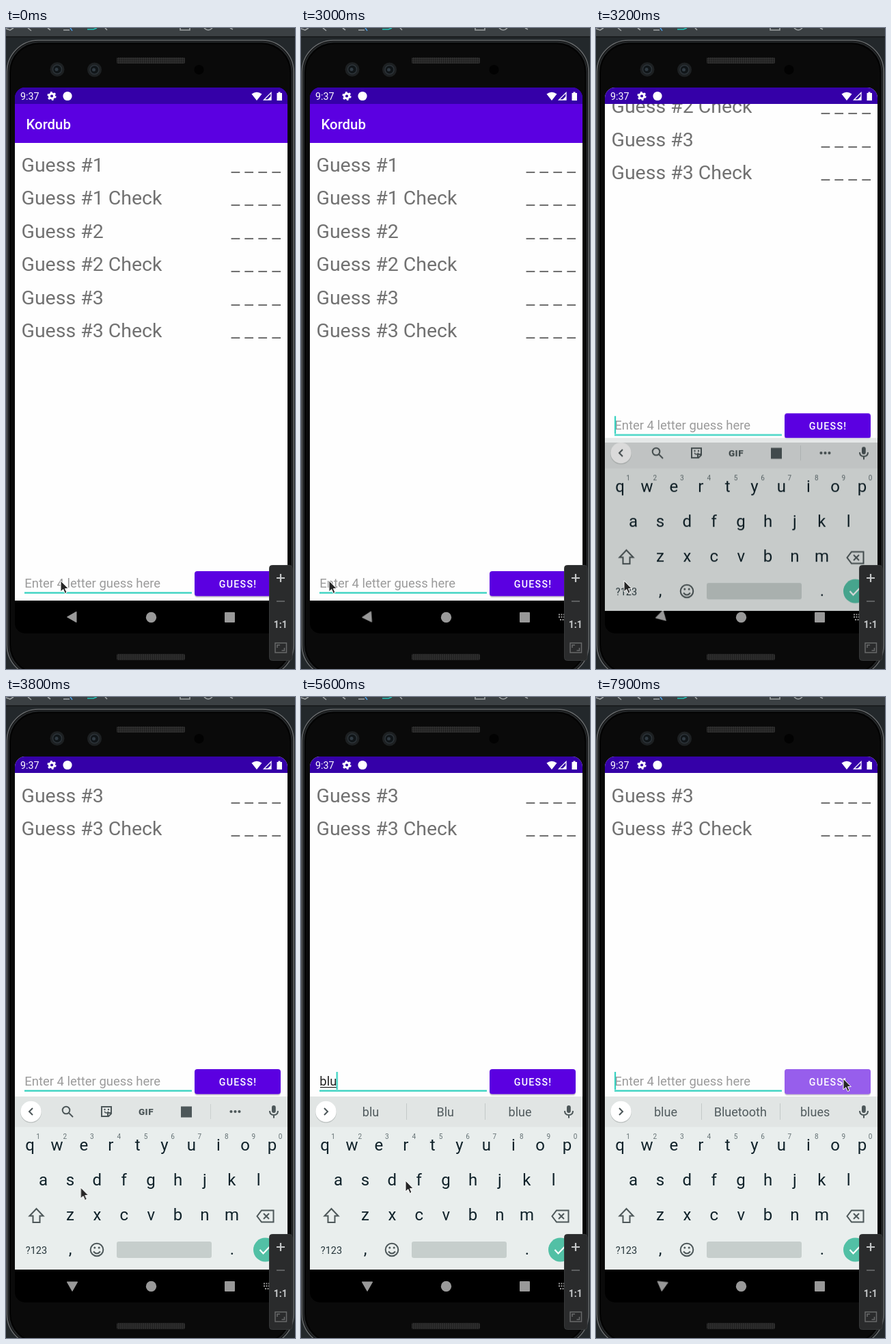
Write an HTML page that moves like this. It is 423 px wide and 937 px high and loops after 8 s.

```html
<!DOCTYPE html>
<html lang="en">
<head>
<meta charset="utf-8">
<title>Word guessing app</title>
<style>
html, body { margin: 0; width: 100%; height: 100%; overflow: hidden; background: #23282b; }
svg { display: block; width: 100vw; height: 100vh; font-family: Roboto, sans-serif; }
.anim, .caret, .ink tspan { animation: 8s linear infinite; }
.step, .caret, .ink tspan { animation-timing-function: step-end; }
.mid { text-anchor: middle; }
.icon { fill: none; stroke: #4d5759; stroke-width: 2; }

#mouse { animation-name: mouse; }
@keyframes mouse {
  0%, 7.5% { transform: translate(80px, 808px); }
  8.75% { transform: translate(66px, 826px); }
  10% { transform: translate(57px, 842px); }
  11.25%, 12.5% { transform: translate(52px, 845px); }
  13.75% { transform: translate(46px, 838px); }
  15%, 16.25% { transform: translate(41px, 824px); }
  21.25%, 30% { transform: translate(41px, 811px); }
  31.25%, 42.5% { transform: translate(41px, 808px); }
  45% { transform: translate(72px, 766px); }
  47.5% { transform: translate(109px, 717px); }
  48.75% { transform: translate(140px, 712px); }
  50%, 82.5% { transform: translate(153px, 707px); }
  83.75%, 85% { transform: translate(241px, 602px); }
  86.25% { transform: translate(290px, 530px); }
  88.75% { transform: translate(340px, 485px); }
  91.25% { transform: translate(384px, 510px); }
  95%, 100% { transform: translate(362px, 558px); }
}

#page { animation-name: pan; }
@keyframes pan {
  0% { transform: none; animation-timing-function: step-end; }
  38.75% { transform: translateY(-212px); animation-timing-function: ease-out; }
  42.5%, 100% { transform: translateY(-250px); }
}
#keys { animation-name: rise; }
@keyframes rise {
  0% { transform: translateY(30px); opacity: 0; animation-timing-function: step-end; }
  38.75% { transform: translateY(30px); opacity: .72; animation-timing-function: ease-out; }
  42.5%, 100% { transform: none; opacity: 1; }
}
#back { transform-origin: 97px 861px; animation-name: turn; }
@keyframes turn {
  0% { transform: none; animation-timing-function: step-end; }
  37.5% { transform: rotate(-4deg); animation-timing-function: step-end; }
  38.75% { transform: rotate(-180deg); animation-timing-function: ease-out; }
  42.5% { transform: rotate(-90deg); animation-timing-function: step-end; }
  98.75%, 100% { transform: rotate(-84deg); }
}
#imeIcon { animation-name: imeIcon; }
@keyframes imeIcon { 0%, 98.75% { opacity: 0; } 37.5% { opacity: .6; } }
#ripple { animation-name: ripple; }
@keyframes ripple { 0% { opacity: 0; } 97.5% { opacity: .15; } 98.75%, 100% { opacity: .37; } }

#hint { animation-name: hint; }
@keyframes hint { 0%, 98.75% { opacity: 1; } 61.25% { opacity: 0; } }
.caret { animation-name: blink; }
@keyframes blink {
  0%, 10%, 21.25%, 33.75%, 46.25%, 80%, 92.5% { opacity: 0; }
  3.75%, 15%, 28.75%, 40%, 52.5%, 86.25%, 97.5% { opacity: 1; }
}
#caretPos { animation-name: caretPos; }
@keyframes caretPos {
  0%, 98.75% { transform: none; }
  61.25% { transform: translateX(10.3px); }
  63.75% { transform: translateX(14.7px); }
  70% { transform: translateX(24.6px); }
  73.75% { transform: translateX(34.5px); }
}
#compose { transform-origin: 28px 0; animation-name: compose; }
@keyframes compose {
  0%, 98.75% { transform: scaleX(0); }
  61.25% { transform: scaleX(.29); }
  63.75% { transform: scaleX(.42); }
  70% { transform: scaleX(.72); }
  73.75% { transform: scaleX(1); }
}
.ink tspan:nth-child(1) { animation-name: ink1; }
.ink tspan:nth-child(2) { animation-name: ink2; }
.ink tspan:nth-child(3) { animation-name: ink3; }
.ink tspan:nth-child(4) { animation-name: ink4; }
@keyframes ink1 { 0%, 98.75% { fill-opacity: 0; } 61.25% { fill-opacity: 1; } }
@keyframes ink2 { 0%, 98.75% { fill-opacity: 0; } 63.75% { fill-opacity: 1; } }
@keyframes ink3 { 0%, 98.75% { fill-opacity: 0; } 70% { fill-opacity: 1; } }
@keyframes ink4 { 0%, 98.75% { fill-opacity: 0; } 73.75% { fill-opacity: 1; } }

#tools { animation-name: tools; }
#strip { animation-name: strip; }
@keyframes tools { 0% { opacity: 1; } 62.5%, 100% { opacity: 0; } }
@keyframes strip { 0% { opacity: 0; } 62.5%, 100% { opacity: 1; } }
.words:nth-child(1) { animation-name: words1; }
.words:nth-child(2) { animation-name: words2; }
.words:nth-child(3) { animation-name: words3; }
.words:nth-child(4) { animation-name: words4; }
@keyframes words1 { 0%, 65% { opacity: 0; } 62.5% { opacity: 1; } }
@keyframes words2 { 0%, 70% { opacity: 0; } 65% { opacity: 1; } }
@keyframes words3 { 0%, 75% { opacity: 0; } 70% { opacity: 1; } }
@keyframes words4 { 0% { opacity: 0; } 75%, 100% { opacity: 1; } }
</style>
</head>
<body>
<svg viewBox="0 0 423 937">
  <defs>
    <clipPath id="screen"><rect x="13" y="87" width="399" height="798" rx="15"/></clipPath>
    <pattern id="mesh" width="3" height="3" patternUnits="userSpaceOnUse">
      <rect width="3" height="3" fill="#303030"/><circle cx="1.5" cy="1.5" r=".9" fill="#141414"/>
    </pattern>
  </defs>

  <!-- desktop and phone body -->
  <rect width="423" height="937" fill="#23282b"/>
  <rect width="423" height="12" fill="#3b4043"/>
  <rect y="12" width="423" height="2" fill="#1a1d1f"/>
  <g fill="none" stroke="#9da1a3" stroke-width="1.6">
    <path d="M0 1l6 2 5-3M32 0l5 4M61 0l4 3M145 0l3 3M255 0v3h14v-3M290 0q6 6 12 0M328 0l4 2"/>
    <path d="M84 3h9" /><path d="M94 0l3 4" stroke="#4a9be0"/><path d="M119 2h9l5-2" stroke="#22c3b8"/>
  </g>
  <g fill="#070707">
    <rect x="1.5" y="18" width="419.5" height="930" rx="46" stroke="#66696b" stroke-width="1.6"/>
    <rect x="4" y="20.5" width="414.5" height="925" rx="44" stroke="#25282a" stroke-width="2"/>
    <rect x="6.5" y="23" width="409.5" height="920" rx="42" fill="#0a0a0a" stroke="#000"/>
  </g>
  <rect x="162" y="43" width="100" height="9" rx="2" fill="url(#mesh)"/>
  <rect x="162" y="915" width="100" height="9" rx="2" fill="url(#mesh)"/>
  <g id="lenses"></g>
  <circle cx="282.500" cy="61" r="7" fill="#020202"/>

  <g clip-path="url(#screen)">
    <rect x="13" y="87" width="399" height="798"/>
    <g id="page" class="anim">
      <rect x="13" y="111" width="399" height="726" fill="#fefefe"/>
      <rect x="13" y="87" width="399" height="81" fill="#5b00e1"/>
      <text x="29.500" y="148" font-size="20.35" font-weight="500" fill="#fff">Kordub</text>
      <g id="rows" font-size="28.49" fill="#717171"></g>
      <text id="hint" class="anim step" x="27.300" y="818" font-size="18.45" fill="#9b9b9b">Enter 4 letter guess here</text>
      <text class="ink" x="27.300" y="818" font-size="18.45" fill="#222"><tspan>b</tspan><tspan>l</tspan><tspan>u</tspan><tspan>e</tspan></text>
      <rect id="compose" class="anim step" x="28" y="820" width="34" height="1.2" fill="#222"/>
      <rect x="27" y="824.500" width="245" height="2.300" fill="#36d2c0"/>
      <g id="caretPos" class="anim step"><rect class="caret" x="27" y="798" width="2.200" height="26" fill="#36d2c0"/></g>
      <rect x="276" y="796" width="126" height="36.500" rx="4" opacity=".18"/>
      <rect x="276" y="794" width="126" height="36.500" rx="4" fill="#5b00e1"/>
      <rect id="ripple" class="anim step" x="276" y="794" width="126" height="36.500" rx="4" fill="#fff" opacity="0"/>
      <text class="mid" x="339.600" y="817.500" font-size="14.25" font-weight="500" letter-spacing="1.27" fill="#fff">GUESS!</text>
    </g>

    <!-- status bar -->
    <rect x="13" y="87" width="399" height="24" fill="#3500a8"/>
    <g fill="#fff">
      <text x="21" y="104.800" font-size="14.25">9:37</text>
      <circle cx="67" cy="99.500" r="3.600" fill="none" stroke="#fff" stroke-width="3"/>
      <circle cx="67" cy="99.500" r="5.600" fill="none" stroke="#fff" stroke-width="2" stroke-dasharray="2.800 3.064"/>
      <circle cx="90" cy="99.500" r="6.600"/>
      <path d="M359.500 96.500Q367 91 374.500 96.500L367 106Z"/>
      <path d="M388 94.500V105H377.500Z" fill="none" stroke="#fff" stroke-width="1.300"/>
      <path d="M388 99.500V105H382.500Z"/>
      <path d="M396.500 95H398.500V93.500H401.500V95H404V106H396.500Z"/>
    </g>

    <!-- keyboard -->
    <g id="keys" class="anim">
      <rect x="13" y="584" width="399" height="253" fill="#e9eeed"/>
      <rect x="13" y="584" width="399" height="44.500" fill="#e1e5e4"/>
      <circle cx="36.500" cy="607" r="15.500" fill="#bcc1c0"/>
      <circle cx="36.500" cy="606" r="15.200" fill="#fff"/>
      <g id="tools" class="anim step">
        <path class="icon" d="M39 601l-5 5 5 5"/>
        <g class="icon">
          <circle cx="88" cy="604" r="5.300"/><path d="M92 608l6 6"/>
          <path d="M141 599h13v10l-4 4h-10v-14zM154 608h-5v5"/>
          <path d="M144 606q3 4 6 0" stroke-width="1.500"/>
        </g>
        <g fill="#4d5759">
          <circle cx="144.500" cy="603" r="1.200"/><circle cx="150" cy="603" r="1.200"/>
          <text class="mid" x="205" y="610.500" font-size="13.500" font-weight="900" letter-spacing=".5">GIF</text>
          <rect x="256" y="598.500" width="16" height="16"/>
          <circle cx="329.500" cy="606" r="2.100"/><circle cx="335.500" cy="606" r="2.100"/><circle cx="341.500" cy="606" r="2.100"/>
        </g>
        <path d="M299.500 595v22" stroke="#cbd0cf"/>
      </g>
      <g id="strip" class="anim step">
        <path class="icon" d="M34 601l5 5-5 5"/>
        <path d="M154.500 594v24M269.500 594v24" stroke="#c3c9c8"/>
        <g id="words" font-size="18" fill="#515b5e"></g>
      </g>
      <rect x="389" y="597" width="5.800" height="11" rx="2.900" fill="#4d5759"/>
      <path class="icon" d="M386 605q0 6 6 6t6-6M392 611v4.500" stroke-width="1.700"/>
      <g id="letters" class="mid" font-size="24" fill="#10222a"></g>
      <path class="icon" d="M44.500 748l10 10.500h-5v9.500h-10v-9.500h-5z"/>
      <path class="icon" d="M374 750.500h17.500v17H374l-6.500-8.500zM377 755l8 8m0-8l-8 8"/>
      <text class="mid" x="44.500" y="813.500" font-size="14.500" fill="#26363b">?123</text>
      <g class="icon"><circle cx="133" cy="808" r="9.300"/><path d="M128 810.500q5 6 10 0"/></g>
      <circle cx="129.800" cy="805" r="1.500" fill="#4d5759"/><circle cx="136.200" cy="805" r="1.500" fill="#4d5759"/>
      <rect x="162" y="796" width="139" height="24" rx="3" fill="#c6cecc"/>
      <circle cx="379.500" cy="808" r="17.500" fill="#52c0a5"/>
      <path d="M371.500 808l5 5.500 10-10.500" fill="none" stroke="#fff" stroke-width="2.200"/>
    </g>

    <!-- navigation bar -->
    <g fill="#fff" opacity=".6">
      <path id="back" class="anim" d="M89.500 861L103 853.300V868.700Z" stroke="#fff" stroke-linejoin="round"/>
      <circle cx="212.500" cy="861.500" r="7.700"/>
      <rect x="320" y="854" width="15" height="15" rx="1"/>
    </g>
    <path id="imeIcon" class="anim step" d="M377 857.500h13M377 861h13M379 865h11" stroke="#fff" stroke-width="2" stroke-dasharray="2 1.500" opacity="0"/>
  </g>

  <!-- emulator panel -->
  <rect x="385.500" y="785.500" width="33.500" height="139" rx="4" fill="#2a2b2c" stroke="#37393a"/>
  <path d="M396 804h12M402 798v12" stroke="#c4c6c7" stroke-width="2.200"/>
  <path d="M396 838h12" stroke="#5d5f60" stroke-width="2"/>
  <text class="mid" x="401.800" y="877" font-size="14" font-weight="700" fill="#c4c6c7">1:1</text>
  <g fill="none" stroke="#68696a" stroke-width="1.500">
    <rect x="394" y="899" width="16.500" height="14"/>
    <path d="M397 906v-4h4M407.500 906v4h-4"/>
  </g>

  <g id="mouse" class="anim">
    <path d="M0 0V16L3.800 12.600 6.300 18.500 9 17.300 6.500 11.600H11.300Z" fill="#262626" stroke="#fff" stroke-width="1"/>
  </g>
</svg>
<script>
const fill = (id, items, draw) => {
  document.getElementById(id).innerHTML = items.map(draw).join('');
};
const label = (x, y, s, attrs = '') => `<text x="${x}" y="${y}" ${attrs}>${s}</text>`;

fill('lenses', [[75, 60.5], [129.5, 61]], ([x, y]) =>
  `<circle cx="${x}" cy="${y}" r="10.500" fill="#1d2022"/>
   <circle cx="${x}" cy="${y}" r="6.500" fill="#101518" stroke="#2c3338" stroke-width="1.500"/>
   <circle cx="${x - 1}" cy="${y}" r="2.500" fill="#303a42"/>`);

fill('rows', ['#1', '#1 Check', '#2', '#2 Check', '#3', '#3 Check'], (s, i) => {
  const y = 209.5 + i * 48.5;
  return label(22.5, y, 'Guess ' + s) + label(402, y, '_ _ _ _', 'text-anchor="end"');
});

fill('words', ['b B be', 'bl Bl black', 'blu Blu blue', 'blue Bluetooth blues'], set =>
  '<g class="words anim step">' +
  set.split(' ').map((s, i) => label(102 + i * 109.3, 613, s, 'class="mid"')).join('') + '</g>');

fill('letters', [['qwertyuiop', 35, 662.5], ['asdfghjkl', 54.5, 713.5], ['zxcvbnm', 94, 765], [',', 94, 815], ['.', 331, 815]],
  ([row, x0, y], r) => [...row].map((c, i) => {
    const x = x0 + i * 39.4;
    const digit = r ? '' : label(x + 12, 646, (i + 1) % 10, 'font-size="10" fill="#637073"');
    return label(x, y, c) + digit;
  }).join(''));
</script>
</body>
</html>
```
